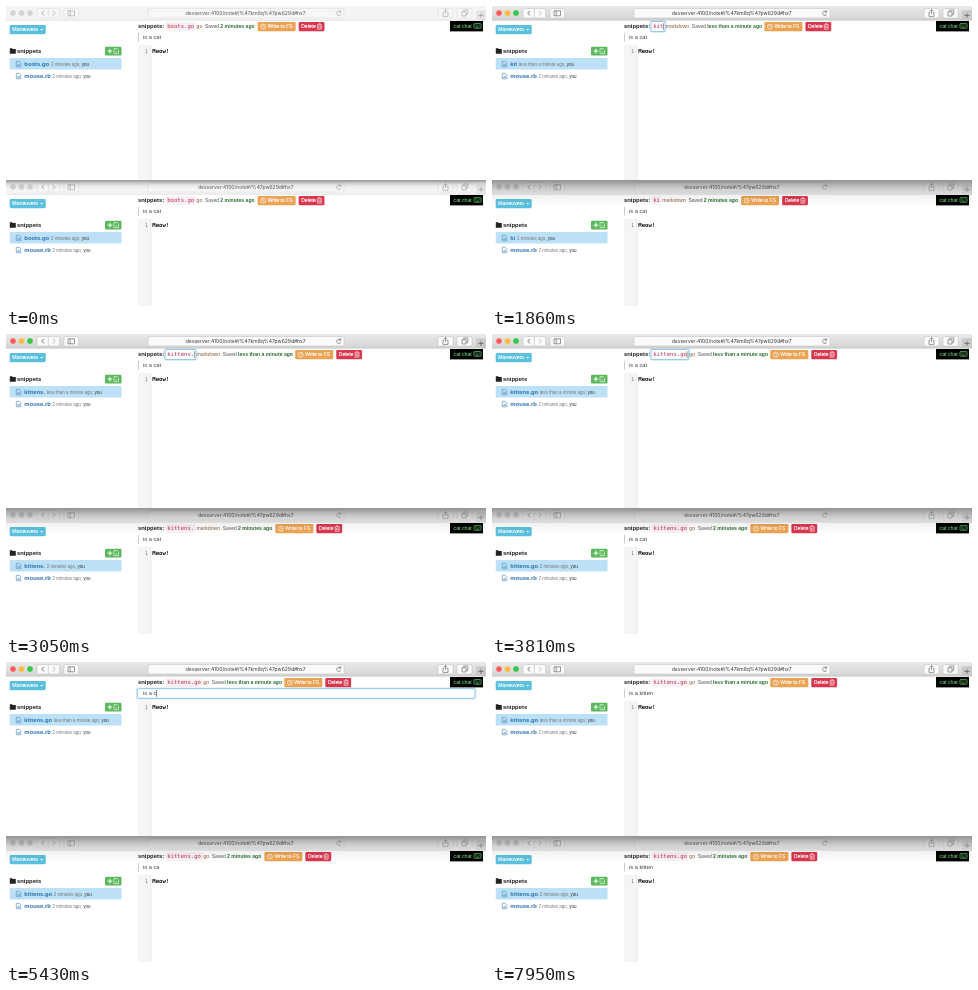
An HTML page for the animation above (8000 ms loop, 480 by 300 pixels).

```html
<!DOCTYPE html>
<html lang="en">
<head>
<meta charset="utf-8">
<title>Shared snippets</title>
<style>
  html, body { margin: 0; width: 100%; height: 100%; overflow: hidden; background: #fff; }
  svg { display: block; width: 100vw; height: 100vh; }
  text { font-family: "Liberation Sans", Arial, sans-serif; white-space: pre; }
  .ui { font-family: Inter, Roboto, sans-serif; }
  .mono { font-family: "DejaVu Sans Mono", "Liberation Mono", monospace; }
  .bold { font-weight: bold; }
  .button { stroke: #fff; stroke-width: .15; }
</style>
</head>
<body>
<svg id="stage" viewBox="0 0 480 300"></svg>
<script>
const LOOP = 8000, LAG = 140, SPLIT = 174;
const CHAR = 3.37;               // advance of one code character
const OLD = '2 minutes ago', RECENT = 'less than a minute ago';
const stage = document.getElementById('stage');
const pen = document.createElement('canvas').getContext('2d');

// Each step patches the state from its time on.
const start = { active: false, focus: '', name: 'boots.go', note: 'is a cat', caret: 0, age: OLD, remoteAge: OLD };
const steps = [
  [400, { active: true }],
  [820, { focus: 'selected' }],
  [1420, { focus: 'name', name: 'k', age: RECENT }],
  ...typing('name', 'k', 'itten', 1580, 180),
  [2620, { name: 'kittens' }],
  [2870, { name: 'kittens.' }],
  [3420, { name: 'kittens.g' }],
  [3600, { name: 'kittens.go' }],
  [4000, { remoteAge: RECENT }],
  [4200, { focus: 'note' }],
  [5000, { caret: 99 }],
  [5250, { note: 'is a ca', remoteAge: OLD }],
  [5430, { note: 'is a c' }],
  [5610, { note: 'is a ' }],
  [6330, { note: 'is a k' }],
  ...typing('note', 'is a k', 'itten', 6660, 160),
  [7600, { focus: '' }],
];

function typing(field, base, added, from, gap) {
  return [...added].map((c, i) => [from + i * gap, { [field]: base + added.slice(0, i + 1) }]);
}

function stateAt(t) {
  return Object.assign({}, start, ...steps.filter(s => s[0] <= t).map(s => s[1]));
}

function measure(text, size) {
  pen.font = `${size * 10}px "Liberation Sans", Arial, sans-serif`;
  return pen.measureText(text).width / 10;
}

const rect = (x, y, w, h, fill, extra = '') =>
  `<rect x="${x}" y="${y}" width="${w}" height="${h}" fill="${fill}" ${extra}/>`;
const line = (d, color, width = 0.7, extra = '') =>
  `<path d="${d}" fill="none" stroke="${color}" stroke-width="${width}" ${extra}/>`;
const text = (x, y, size, fill, content, cls = '', extra = '') =>
  `<text x="${x}" y="${y}" font-size="${size}" fill="${fill}" class="${cls}" ${extra}>${content}</text>`;
const round = r => `rx="${r}"`;

// Focused input: blue border with a soft glow.
const focusBox = (x, y, w, h) =>
  rect(x, y, w, h, '#fff', `${round(1)} stroke="#74b9e6" stroke-opacity=".2" stroke-width="3"`)
  + rect(x, y, w, h, '#fff', `${round(1)} stroke="#74b9e6" stroke-width=".8"`);

function toolbar(active, address) {
  const ink = active ? '#555' : '#999';
  const edge = active ? '#c4c4c4' : '#dedede';
  const lights = active ? ['#fc5b57', '#fdbc40', '#34c84a'] : ['#d3d3d3', '#d3d3d3', '#d3d3d3'];
  const box = (x, w) => rect(x, 2.5, w, 9.5, active ? '#fbfbfb' : '#f7f7f7',
    `${round(1.5)} stroke="${edge}" stroke-width=".6"`);
  return rect(0, 0, 480, 14, active ? 'url(#bar)' : '#f4f4f4')
    + lights.map((c, i) => `<circle cx="${7 + i * 8.5}" cy="7" r="2.8" fill="${c}"/>`).join('')
    + box(31, 22.5) + box(58, 14.5) + box(142, 196) + box(432, 15) + box(451, 15)
    + line('M42.3 2.5V12', edge)
    + line('M38 4.8l-2.2 2.4 2.2 2.4', ink, 0.8)
    + line('M46.8 4.8l2.2 2.4-2.2 2.4', '#aaa', 0.8)
    + line('M62 4.8h6.5v5h-6.5zM64.2 4.8v5', ink, 0.6)
    + text(239.7, 9, 5, active ? '#333' : '#555', address, 'ui', 'text-anchor="middle"')
    + line('M334.6 6a2.2 2.2 0 1 0 .3 2M334.8 4.2v2h-2', ink, 0.6)
    + line('M438.2 6.2h-1.2v4.2h5v-4.2h-1.2M439.5 8V3.6M438 5l1.5-1.5L441 5', ink, 0.6)
    + line('M456 5.8h4v4.2h-4zM457.8 5.8v-1.8h4v4.2h-1.8', ink, 0.6)
    + rect(470, 4.5, 10, 9.5, active ? '#c9c9c9' : '#e6e6e6')
    + line('M475 7v5M472.5 9.5h5', ink, 0.7)
    + line('M0 14.2H480', active ? '#b5b5b5' : '#d2d2d2', 0.6);
}

function listRow(y, name, age) {
  return line(`M10.3 ${y - 2.7}h3l1.5 1.5v4h-4.5zM11.4 ${y + 0.3}h2.3M11.4 ${y + 1.5}h2.3`, '#4a86b8', 0.6)
    + text(18.3, y + 2, 5.9, '#2d72ae', `${name}<tspan font-size="4.5" font-weight="normal" fill="#777" dx="1.7">${age}, </tspan>`
      + '<tspan font-size="4.5" font-weight="normal" fill="#333">you</tspan>', 'bold');
}

function sidebar(name, age) {
  return rect(3.7, 19, 36, 9.2, '#5bc0de', round(1.3))
    + text(6.3, 25.4, 5.2, '#fff', 'Maneuvers', 'button')
    + '<path d="M34.2 22.9h3l-1.5 1.7z" fill="#fff"/>'
    + '<path d="M3.8 42.3h2.3l.7.8h3v4.6h-6z" fill="#222"/>'
    + text(11, 47.2, 5.9, '#222', 'snippets', 'bold')
    + rect(99, 40.7, 16.5, 8.8, '#5cb85c', round(1.2))
    + line('M101.5 45.1h4.8M103.9 42.7v4.8', '#fff', 1)
    + line('M108 42.6h3.2l1.4 1.4v3.7h-4.6zM109.3 45.9h2', '#fff', 0.6)
    + rect(3.7, 52, 111.8, 11.6, '#bce0f6', round(0.8))
    + listRow(58, name, age)
    + listRow(70, 'mouse.rb', OLD);
}

function header({ name, focus }, age) {
  const known = name.endsWith('.go');
  const codeW = name.length * CHAR;
  const langX = 161.2 + codeW + 2.4;
  const savedX = langX + (known ? 6 : 23.7) + 2.4;
  const ageX = savedX + 15.4;
  const writeX = ageX + (age === RECENT ? 54.3 : 34.4) + 2.9;
  const deleteX = writeX + 41;
  const editing = focus === 'name' || focus === 'selected';
  return text(132, 22.3, 5.9, '#222', 'snippets:', 'bold')
    + (editing ? focusBox(159, 15.4, codeW + 4, 10.2) : rect(159.4, 16, codeW + 3.4, 9.2, '#f9f2f4', round(1)))
    + (focus === 'selected' ? rect(161, 17.2, codeW + 0.4, 6.8, '#b1d4f8') : '')
    + text(161.2, 22.4, 5.6, '#c7254e', name, 'mono')
    + (focus === 'name' ? line(`M${161.4 + codeW} 17.2v6.8`, '#333', 0.5) : '')
    + text(langX, 22.2, 5.1, '#8a5a35', known ? 'go' : 'markdown')
    + text(savedX, 22.2, 5, '#555', 'Saved')
    + text(ageX, 22.2, 5.1, '#2f6f33', age, 'bold')
    + rect(writeX, 16, 38, 9.2, '#eda252', round(1.3))
    + `<circle cx="${writeX + 5.5}" cy="20.6" r="2.5" fill="none" stroke="#fff" stroke-width=".7"/>`
    + line(`M${writeX + 5.5} 19v1.8h1.2`, '#fff', 0.6)
    + text(writeX + 10, 22.4, 5, '#fff', 'Write to FS', 'button')
    + rect(deleteX, 16, 25.8, 9.2, '#da374f', round(1.3))
    + text(deleteX + 2.6, 22.4, 5, '#fff', 'Delete', 'button')
    + line(`M${deleteX + 18.3} 18.8h5M${deleteX + 20} 18.6v-.9h1.6v.9`
      + `M${deleteX + 18.9} 19v4.2h3.8V19M${deleteX + 20.1} 20v2.2M${deleteX + 21.5} 20v2.2`, '#fff', 0.6);
}

function noteField({ note, focus, caret }) {
  const caretX = 137 + measure(note.slice(0, caret), 5.7) + 0.3;
  return (focus === 'note'
    ? focusBox(131.3, 26.7, 337.7, 9.6) + line(`M${caretX} 28v6.8`, '#222', 0.6)
    : line('M132.5 26.8v9', '#c8c8c8', 0.9))
    + text(137, 33.2, 5.7, '#444', note);
}

function editor() {
  return rect(132, 39, 13, 135, '#f5f5f5')
    + line('M145 39V174', '#dfdfdf', 0.6)
    + text(139, 47.3, 5.2, '#777', '1', 'mono')
    + text(146.3, 47.3, 5.6, '#111', 'Meow!', 'mono bold');
}

function chatButton() {
  const green = '#7cf58a';
  return rect(444, 15, 33, 10.4, '#000')
    + text(447.6, 21.8, 5.2, green, 'cat chat')
    + rect(468, 17.6, 7, 4.6, 'none', `stroke="${green}" stroke-width=".6" rx=".5"`)
    + line('M469 19h5M469 20h5', green, 0.5, 'stroke-dasharray=".7 .6"')
    + line('M470 21.2h3', green, 0.5);
}

function browser(state, address, listAge, headerAge) {
  return rect(0, 0, 480, SPLIT, '#fff') + toolbar(state.active, address)
    + sidebar(state.name, listAge) + header(state, headerAge)
    + noteField(state) + editor() + chatButton();
}

const defs = `<defs>
  <linearGradient id="bar" x2="0" y2="1"><stop stop-color="#e9e9e9"/><stop offset="1" stop-color="#d4d4d4"/></linearGradient>
  <linearGradient id="shade" x2="0" y2="1"><stop stop-color="#000" stop-opacity=".4"/><stop offset=".3" stop-color="#000" stop-opacity=".19"/><stop offset=".6" stop-color="#000" stop-opacity=".06"/><stop offset="1" stop-color="#000" stop-opacity="0"/></linearGradient>
</defs>`;
let shown = '';

function frame(now) {
  const t = now % LOOP;
  const mine = stateAt(t);
  const other = { ...stateAt(t - LAG), active: false, focus: '' };
  const markup = defs
    + `<g transform="translate(0 ${SPLIT})">`
    + browser(other, 'devserver:4100/note#/%47pw629d#hx7', other.remoteAge, OLD)
    + rect(0, 0, 480, mine.active ? 25 : 9, 'url(#shade)') + '</g>'
    + browser(mine, 'devserver:4100/note#/%47km8q%47pw629d#hx7', mine.age, mine.age);
  if (markup !== shown) stage.innerHTML = shown = markup;
  requestAnimationFrame(frame);
}
requestAnimationFrame(frame);
</script>
</body>
</html>
```
